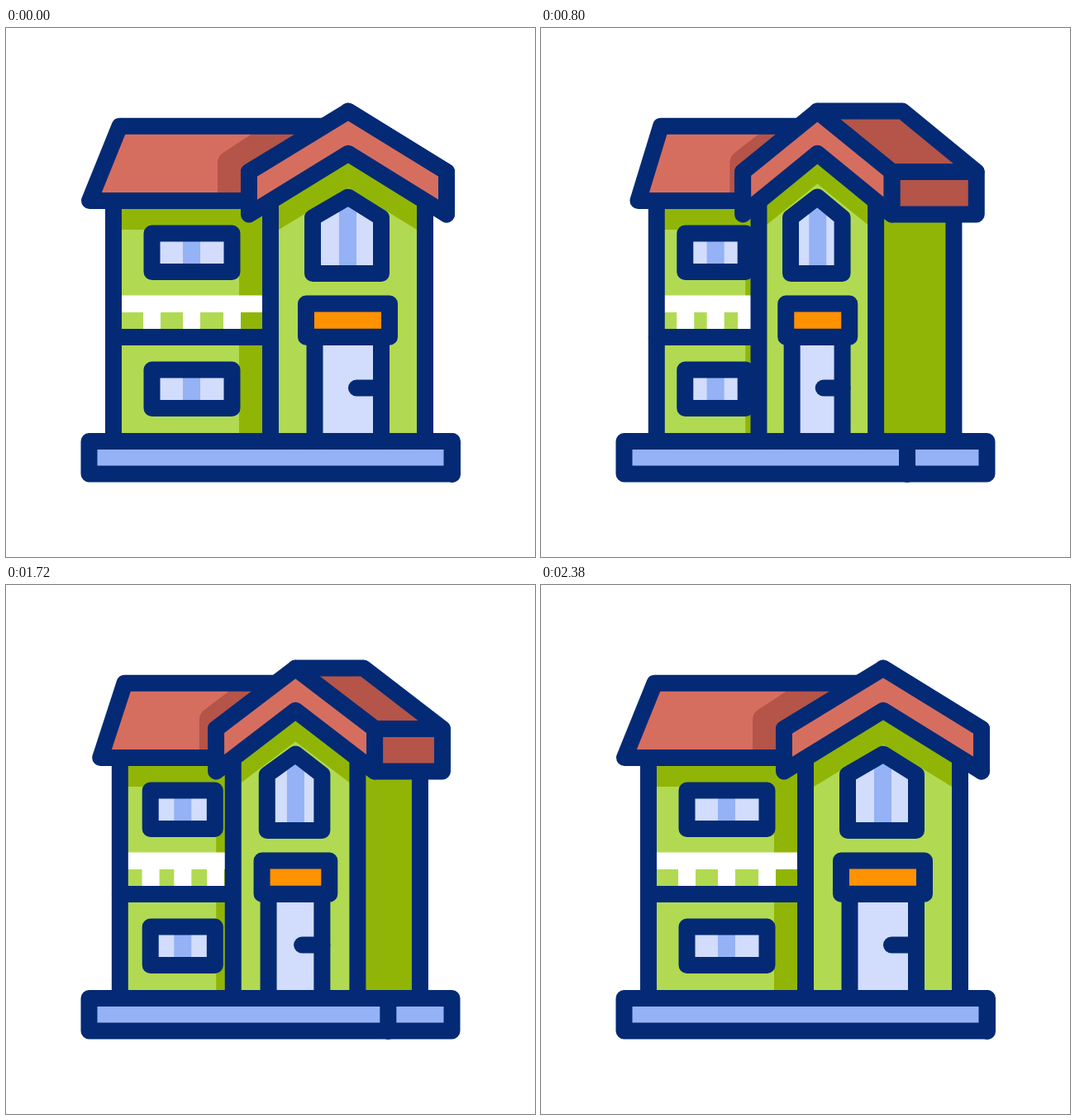
An HTML page with a canvas that plays this animation: 640x640 px, repeating every 2.4 s.

```html
<!DOCTYPE html>
<html lang="en">
<head>
<meta charset="utf-8">
<title>House</title>
<style>
  html, body { margin: 0; width: 100%; height: 100%; overflow: hidden; background: #fff; }
  canvas { display: block; }
</style>
</head>
<body>
<canvas id="stage" width="640" height="640"></canvas>
<script>
const ctx = document.getElementById('stage').getContext('2d');
const NAVY = '#042a75', RED = '#d66e5f', DARK_RED = '#b55448', GREEN = '#b1da52',
  DARK_GREEN = '#91b507', PALE = '#d2dcfd', BLUE = '#94b2f5', ORANGE = '#ff9200', WHITE = '#fff';
const LOOP = 2400, TURN = 1200, BACK = 1180, EASE = 0.77;

let turn = 0; // 0 = front view, 1 = turned to show the side

// Symmetric cubic bezier (EASE, 0, 1 - EASE, 1)
function ease(x) {
  let lo = 0, hi = 1, s = 0.5;
  for (let i = 0; i < 24; i++) {
    s = (lo + hi) / 2;
    const r = 1 - s;
    if (3 * EASE * s * r * r + 3 * (1 - EASE) * s * s * r + s ** 3 < x) lo = s;
    else hi = s;
  }
  return s * s * (3 - 2 * s);
}

// Horizontal positions are pairs [front view, turned view]
const at = ([front, side]) => front + (side - front) * turn;

function trace(points, closed) {
  ctx.beginPath();
  for (const [x, y] of points) ctx.lineTo(at(x), y);
  if (closed) ctx.closePath();
}
function fill(color, ...points) {
  trace(points, true);
  ctx.fillStyle = color;
  ctx.fill();
}
function outline(...points) {
  trace(points, true);
  ctx.stroke();
}
function line(...points) {
  trace(points, false);
  ctx.stroke();
}
function shape(color, ...points) {
  fill(color, ...points);
  outline(...points);
}
const box = (l, r, top, bottom) => [[l, top], [r, top], [r, bottom], [l, bottom]];
const shift = ([a, b], d) => [a + d, b + d];

const wallL = [130, 141], frontL = [320, 256.5], frontR = [507, 392.5], wallR = [507, 498.5];
const apex = [414, 324.5], ridge = [414, 440];
const eaveL = [294, 238], eaveR = [533, 411], eaveBack = [533, 526];
const winL = [176.5, 174], winR = [273.5, 244.5];
const stripes = [[166, 164], [214, 199], [263, 235]];
const doorL = [373.5, 295], doorR = [454, 353.5];
const gableL = [371, 293.5], gableR = [454, 353.5], gableStripe = [403, 314.5];

function leftWing() {
  fill(GREEN, ...box(wallL, frontL, 209, 500));
  fill(DARK_GREEN, ...box(wallL, frontL, 209, 244));
  fill(DARK_GREEN, ...box([282, 243], frontL, 209, 500));
  fill(WHITE, ...box(wallL, frontL, 323.5, 344));
  for (const x of stripes) fill(WHITE, ...box(x, shift(x, 21), 343, 366));
  line([wallL, 374], [frontL, 374]);
  line([wallL, 209], [wallL, 500]);
  for (const y of [248.5, 413.5]) {
    const frame = box(winL, winR, y, y + 46.5);
    fill(PALE, ...frame);
    fill(BLUE, ...box(stripes[1], shift(stripes[1], 21), y, y + 46.5));
    outline(...frame);
  }
}

function leftRoof() {
  const low = [101, 119.5], high = [137.5, 146], join = [385, 303];
  const roof = [[low, 209], [high, 118.7], [join, 118.7], [eaveL, 174], [eaveL, 209]];
  fill(RED, ...roof);
  const edge = at([256, 225]), bend = at([264, 232]);
  ctx.beginPath();
  ctx.moveTo(edge, 209);
  ctx.lineTo(edge, 163);
  ctx.quadraticCurveTo(edge, 155, bend, 150);
  ctx.lineTo(at([297, 259]), 128.5);
  ctx.lineTo(at(join), 119);
  ctx.lineTo(at(eaveL), 174);
  ctx.lineTo(at(eaveL), 209);
  ctx.fillStyle = DARK_RED;
  ctx.fill();
  outline(...roof);
}

function frontWing() {
  const shadeY = 244 - 7 * turn, shadeTop = 193 - 5 * turn;
  fill(GREEN, [frontL, 209], [apex, 152], [frontR, 209], [frontR, 500], [frontL, 500]);
  fill(DARK_GREEN, [frontL, 209], [apex, 152], [frontR, 209],
    [shift(frontR, -10), shadeY], [apex, shadeTop], [shift(frontL, 10), shadeY]);
  line([frontL, 209], [frontL, 500]);
  line([frontR, 209], [frontR, 500]);

  const frame = [[gableL, 229.5], [apex, 204.5], [gableR, 229.5], [gableR, 297], [gableL, 297]];
  fill(PALE, ...frame);
  fill(BLUE, ...box(gableStripe, shift(gableStripe, 21), 212, 297));
  outline(...frame);

  shape(PALE, ...box(doorL, doorR, 374, 500));
  line([[424, 331.5], 435.5], [doorR, 435.5]);
  shape(ORANGE, ...box([363, 288], [464, 362], 333.5, 373.8));
}

function frontRoof() {
  shape(DARK_RED, [apex, 100.5], [ridge, 100.5], [eaveBack, 174], [eaveR, 174]);
  shape(DARK_RED, ...box(eaveR, eaveBack, 174, 225.5));
  shape(RED, [apex, 100.8], [eaveR, 174], [eaveR, 225.5], [apex, 151.8], [eaveL, 225.5], [eaveL, 174]);
}

function base() {
  const split = [540, 431];
  shape(BLUE, ...box([100.5, 100.5], [539.5, 539.5], 500, 539.5));
  line([split, 500], [split, 540]);
}

function draw(now) {
  const t = now % LOOP;
  turn = t < TURN ? ease(t / TURN) : 1 - ease(Math.min(1, (t - TURN) / BACK));
  ctx.fillStyle = WHITE;
  ctx.fillRect(0, 0, 640, 640);
  ctx.strokeStyle = NAVY;
  ctx.lineWidth = 20;
  ctx.lineJoin = ctx.lineCap = 'round';
  fill(DARK_GREEN, ...box(frontR, wallR, 209, 500));
  line([wallR, 215], [wallR, 500]);
  leftWing();
  leftRoof();
  frontWing();
  frontRoof();
  base();
}

const start = performance.now();
function tick() {
  draw(performance.now() - start);
  requestAnimationFrame(tick);
}
tick();
</script>
</body>
</html>
```
